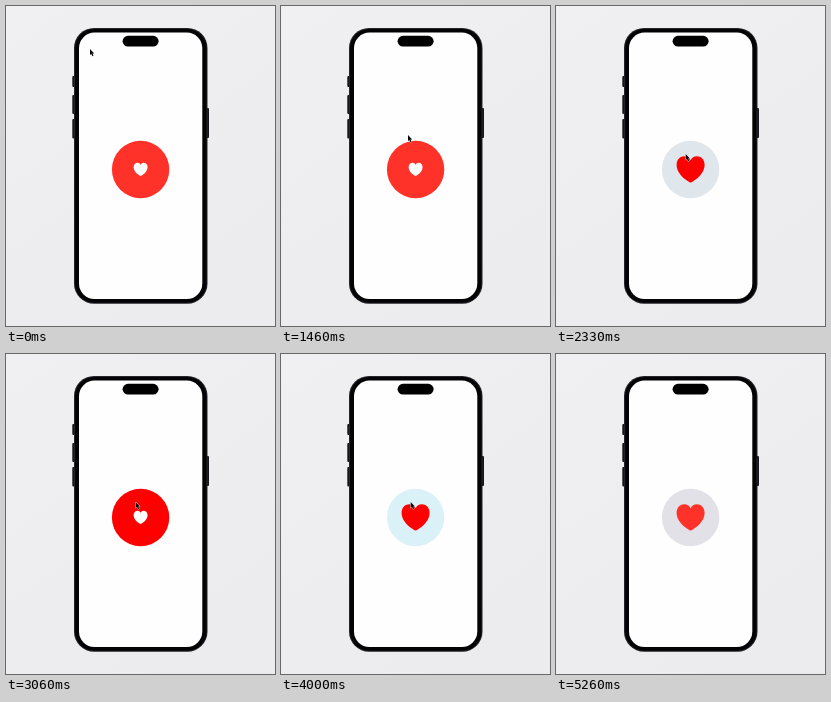
Write an HTML page that moves like this. It is 269 by 320 pixels and loops after 5.33 s.

```html
<!DOCTYPE html>
<html lang="en">
<head>
<meta charset="utf-8">
<title>Heart button</title>
<style>
  html, body { margin: 0; width: 100%; height: 100%; overflow: hidden; background: #eeeef0; }
  svg { display: block; width: 100vw; height: 100vh; }
</style>
</head>
<body>
<svg viewBox="0 0 269 320">
  <defs>
    <linearGradient id="wall" x1="0" y1="0" x2="0.6" y2="1">
      <stop offset="0" stop-color="#f0f0f2"/>
      <stop offset="1" stop-color="#ececef"/>
    </linearGradient>
  </defs>
  <rect width="269" height="320" fill="url(#wall)"/>

  <g fill="#15161b">
    <rect x="66.3" y="70" width="3" height="11" rx="1"/>
    <rect x="66.3" y="89" width="3" height="19" rx="1"/>
    <rect x="66.3" y="113" width="3" height="19.5" rx="1"/>
    <rect x="200" y="102" width="3" height="30" rx="1"/>
  </g>
  <rect x="68" y="22" width="133.5" height="275.7" rx="20" fill="#24262c"/>
  <rect x="69" y="23" width="131.5" height="273.7" rx="19" fill="#030305"/>
  <rect x="73" y="26.6" width="123.3" height="266.4" rx="15.5" fill="#fefefe"/>
  <rect x="116.6" y="29.8" width="36" height="10.8" rx="5.4" fill="#000"/>

  <circle id="disc" cx="134.6" cy="163.5" r="28.7"/>
  <path id="heart" d="M0 13.3C-.7 13.3-1.5 12.8-2.2 12.3C-9.4 7.6-14 1.8-14-4.3C-14-9.6-10.4-13-6.3-13C-3.4-13-1.2-11.4 0-9C1.2-11.4 3.4-13 6.3-13C10.4-13 14-9.6 14-4.3C14 1.8 9.4 7.6 2.2 12.3C1.5 12.8.7 13.3 0 13.3Z"/>
  <path id="cursor" d="M0 0V6L1.3 4.9L2.4 7.3L3.5 6.8L2.5 4.5L4.2 4.4Z" fill="#0a0a0a" stroke="#fff" stroke-width=".7" paint-order="stroke" stroke-linejoin="round"/>
</svg>
<script>
const LOOP = 5330;
const RED = [255, 50, 41], GRAY = [225, 225, 231], WHITE = [254, 254, 254];
const TAPS = [1859, 2929, 3785];
const HIDE = 5130;

// time, x, y of the pointer tip
const PATH = [
  [0, 84, 43], [60, 84, 43], [530, 102, 54], [860, 127, 129],
  [1460, 127, 129], [1660, 129.7, 148], [4600, 129.7, 148], [HIDE, 53, 0]
];

const disc = document.getElementById('disc');
const heart = document.getElementById('heart');
const cursor = document.getElementById('cursor');

const clamp = v => Math.min(1, Math.max(0, v));
const mix = (a, b, p) => a + (b - a) * p;
const toLinear = c => Math.pow(c / 255, 2.2);
const toByte = v => Math.round(255 * Math.pow(clamp(v), 1 / 2.2));

// Blending in linear light, so overshoot also shifts the hue
function blend(from, to, p) {
  const rgb = from.map((c, i) => toByte(mix(toLinear(c), toLinear(to[i]), p)));
  return `rgb(${rgb.join()})`;
}

function spring(ms, response = 0.3, damping = 0.3) {
  const s = ms / 1000, w = 2 * Math.PI / response;
  const k = Math.sqrt(1 - damping * damping);
  return 1 - Math.exp(-damping * w * s) *
    (Math.cos(w * k * s) + damping / k * Math.sin(w * k * s));
}

const easeOut = p => 1 - Math.pow(1 - clamp(p), 3);
const smooth = p => p * p * (3 - 2 * p);

function pointerAt(t) {
  const i = PATH.findIndex(k => k[0] > t);
  const a = PATH[i - 1], b = PATH[i];
  const p = smooth((t - a[0]) / (b[0] - a[0]));
  return [mix(a[1], b[1], p), mix(a[2], b[2], p)];
}

function draw(t) {
  const count = TAPS.filter(tap => tap <= t).length;
  const since = count ? t - TAPS[count - 1] : 0;
  const liked = count % 2;
  const toward = (p) => !count ? 0 : liked ? p : 1 - p;

  const tint = toward(spring(since));
  const size = mix(0.5, 1, toward(easeOut(since / 110)));
  disc.setAttribute('fill', blend(RED, GRAY, tint));
  heart.setAttribute('fill', blend(WHITE, RED, tint));
  heart.setAttribute('transform', `translate(134.6 163.3) scale(${size})`);

  const shown = t < HIDE;
  cursor.setAttribute('visibility', shown ? 'visible' : 'hidden');
  if (shown) cursor.setAttribute('transform', `translate(${pointerAt(t).join(' ')})`);
}

const start = performance.now();
function tick() {
  draw((performance.now() - start) % LOOP);
  requestAnimationFrame(tick);
}
tick();
</script>
</body>
</html>
```
